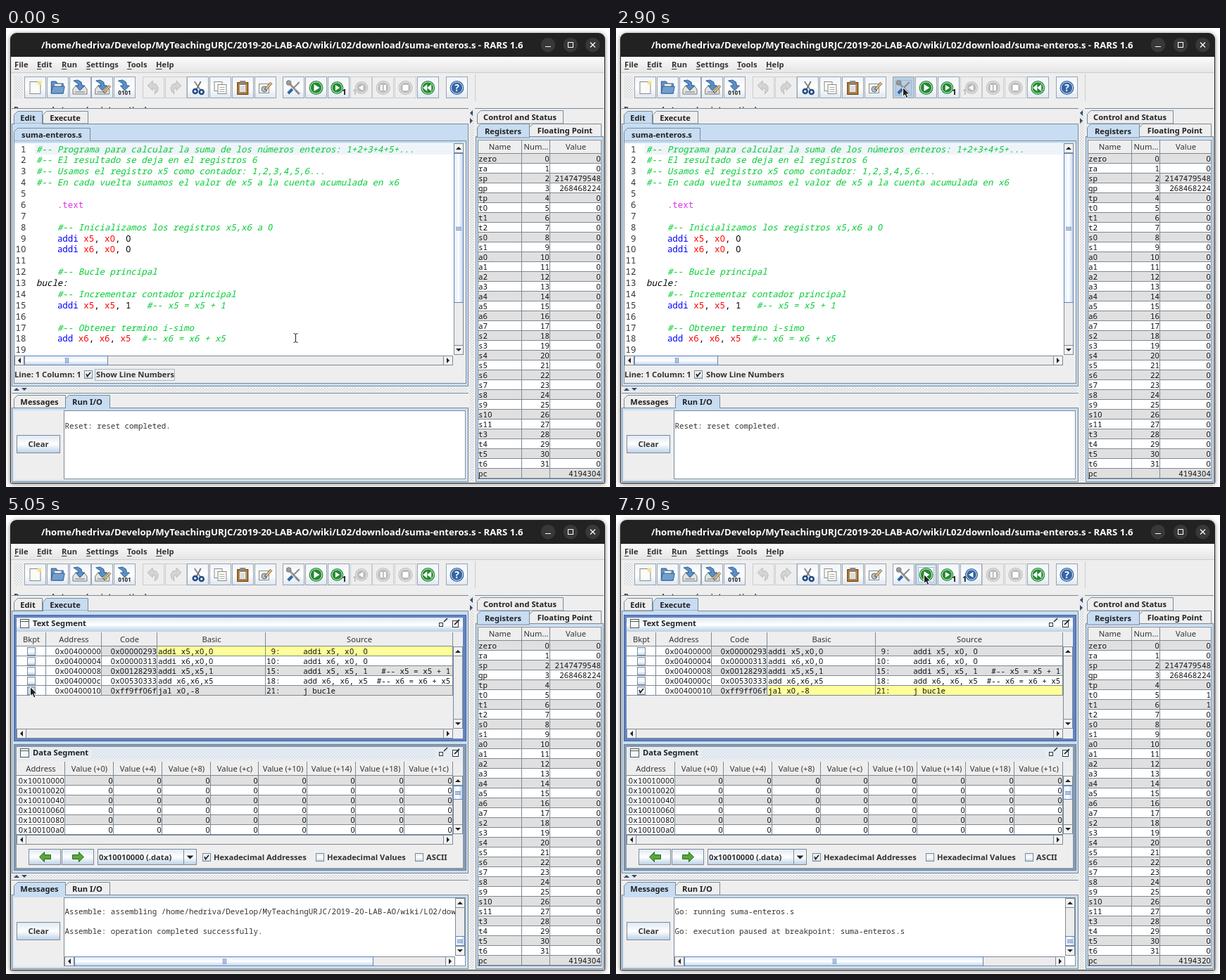
Animation of 858x653 px, one loop 8000 ms. Source, as an HTML page with a canvas:

```html
<!DOCTYPE html>
<html lang="es">
<head>
<meta charset="utf-8">
<title>RARS</title>
<style>
html, body { margin: 0; width: 858px; height: 653px; overflow: hidden; background: #fff; }
canvas { display: block; }
</style>
</head>
<body>
<canvas id="stage" width="858" height="653"></canvas>
<script>
const g = document.getElementById('stage').getContext('2d');
const BOLD = 'bold 11.2px "Noto Sans", sans-serif', PLAIN = '11.2px "Noto Sans", sans-serif';
const SMALL = 10.9, CODE = 12.45, PITCH = .6;
const LINE = '#7a8a99', BLUE = '#c8ddf2', FACE = '#eee', EDGE = '#6382bf', STRIPE = '#e0e0e0';
const PATH = '/home/hedriva/Develop/MyTeachingURJC/2019-20-LAB-AO/wiki/L02/download/suma-enteros.s';

// Drawing helpers
function box(x, y, w, h, fill, line) {
  if (fill) { g.fillStyle = fill; g.fillRect(x, y, w, h); }
  if (line) { g.strokeStyle = line; g.lineWidth = 1; g.strokeRect(x + .5, y + .5, w - 1, h - 1); }
}
function text(s, x, y, font = BOLD, color = '#333', align = 'left') {
  g.font = font; g.fillStyle = color; g.textAlign = align;
  g.fillText(s, x, y);
}
// Fixed-pitch text whose zeros are plain ovals, without a slash
function mono(s, x, y, size = SMALL, color = '#222', right = false, style = '') {
  s = String(s);
  const pitch = size * PITCH;
  if (right) x -= s.length * pitch;
  text(s.replace(/0/g, ' '), x, y, `${style} ${size}px "Noto Sans Mono", monospace`, color);
  for (const zero of s.matchAll(/0/g))
    text('0', x + (zero.index + .5) * pitch, y, `${style} ${size}px "Noto Sans", sans-serif`, color, 'center');
}
function poly(pts, fill, line, width = 1, close = true) {
  g.beginPath();
  for (let i = 0; i < pts.length; i += 2) g.lineTo(pts[i], pts[i + 1]);
  if (close) g.closePath();
  if (fill) { g.fillStyle = fill; g.fill(); }
  if (line) { g.strokeStyle = line; g.lineWidth = width; g.stroke(); }
}
const stroke = (pts, color, width = 1) => poly(pts, null, color, width, false);
function circle(x, y, r, fill, line, width = 1) {
  g.beginPath(); g.arc(x, y, r, 0, 7);
  if (fill) { g.fillStyle = fill; g.fill(); }
  if (line) { g.strokeStyle = line; g.lineWidth = width; g.stroke(); }
}
function clipped(x, y, w, h, draw) {
  g.save(); g.beginPath(); g.rect(x, y, w, h); g.clip(); draw(); g.restore();
}
function shade(x, y, x2, y2, colors = ['#dde8f3', '#fff', '#b8cfe5']) {
  const s = g.createLinearGradient(x, y, x2, y2);
  colors.forEach((c, i) => s.addColorStop(i / (colors.length - 1), c));
  return s;
}
function bumps(x, y, w, h, color = '#b4c0cc') {
  g.fillStyle = color;
  for (let j = 0; j < h; j += 2)
    for (let i = j % 4; i < w; i += 4) g.fillRect(x + i, y + j, 1, 1);
}
function triangle(x, y, dir, r = 4, color = '#222') {
  g.save(); g.translate(x, y); g.rotate(dir * Math.PI / 2);
  poly([-r, r / 2, r, r / 2, 0, -r / 2], color);
  g.restore();
}
function check(x, y, on, pressed) {
  box(x, y, 12, 12, pressed ? '#b8cfe5' : shade(x, y, x, y + 12), LINE);
  if (on) stroke([x + 3, y + 5, x + 4.5, y + 8.5, x + 9, y + 3], '#222', 1.8);
}
function tab(label, x, y, w, h, selected) {
  poly([x + .5, y + h, x + .5, y + 5.5, x + 5.5, y + .5, x + w + .5, y + .5, x + w + .5, y + h], selected ? BLUE : FACE, LINE);
  text(label, x + w / 2, y + h / 2 + 4.5, BOLD, '#222', 'center');
}
function pane(x, y, w, h) {
  box(x, y, w, h, BLUE, LINE);
  box(x + 3, y + 4, w - 6, h - 7, FACE);
}
function scrollbar(x, y, len, vertical, start, size) {
  const w = vertical ? 14 : len, h = vertical ? len : 14;
  box(x, y, w, h, '#ececec', LINE);
  box(x, y, 14, 14, '#f2f2f2', LINE);
  box(x + w - 14, y + h - 14, 14, 14, '#f2f2f2', LINE);
  triangle(x + 7, y + 7, vertical ? 0 : 3);
  triangle(x + w - 7, y + h - 7, vertical ? 2 : 1);
  if (!size) return;
  const tx = vertical ? x : start, ty = vertical ? start : y;
  const tw = vertical ? 14 : size, th = vertical ? size : 14;
  box(tx, ty, tw, th, vertical ? shade(tx, 0, tx + 14, 0) : shade(0, ty, 0, ty + 14), EDGE);
  for (let k = -2; k <= 2; k += 2) {
    if (vertical) box(tx + 3, Math.round(ty + th / 2 + k), 8, 1, EDGE);
    else box(Math.round(tx + tw / 2 + k), ty + 3, 1, 8, EDGE);
  }
}
function header(labels, edges, y, h) {
  labels.forEach((s, i) => {
    const x = edges[i], w = edges[i + 1] - x;
    box(x, y, w, h, FACE);
    box(x + w - 1, y, 1, h, LINE);
    text(s, x + w / 2, y + h / 2 + 4, PLAIN, '#333', 'center');
  });
  box(edges[0], y + h - 1, edges[edges.length - 1] - edges[0], 1, LINE);
}
function cell(s, x, x2, y, fill, right) {
  box(x, y, x2 - x, 14, fill);
  box(x, y + 13, x2 - x, 1, LINE);
  box(x2 - 1, y, 1, 14, LINE);
  mono(s, right ? x2 - 1 : x + 1, y + 11, SMALL, '#111', right);
}

// Toolbar icons, drawn around their own centre
const GREEN = '#238a32', GREY = '#bbb', NAVY = '#3465a4';
const page = (x, y, w, h) => box(x, y, w, h, '#fbfbf7', '#888');
const saveArrow = y => poly([-9, y - 9, -3, y - 10, 2, y - 7, 3, y - 2, 7, y - 2, 0, y + 5, -6, y - 2, -2, y - 2, -3, y - 5, -6, y - 7], '#5b8fc4', '#2d5f96');
function drive() {
  poly([-10, 2, -6, -3, 6, -3, 10, 2, 10, 9, -10, 9], '#e4e4e0', '#777');
  box(-7, 5, 14, 2, '#aaa');
  saveArrow(-1);
}
function bent(dir) {
  poly([-8 * dir, -3, -1 * dir, -10, -1 * dir, -6, 4 * dir, -5, 7 * dir, 0, 6 * dir, 5, 2 * dir, 9, 3 * dir, 2, -1 * dir, 0, -1 * dir, 4], '#d4d4d4', GREY);
}
function ball(x, r, color) { circle(x, 0, r, color); circle(x, 0, r - 1.8, null, '#fff', .9); }
function pencil(x, y) {
  stroke([x, y, x + 9, y - 10], '#666', 4);
  stroke([x + 1, y - 1, x + 9, y - 10], '#e9b96e', 2.5);
}
const play = (x, r) => poly([x - r * .6, -r, x + r, 0, x - r * .6, r], '#fff');
const icons = [
  () => { page(-8, -9, 16, 18); circle(6, -7, 3, '#f4e48a'); },
  () => { poly([-9, 8, -9, -9, -2, -9, 0, -6, 8, -6, 8, 8], '#5b8fc4', '#2d5f96'); page(-5, -6, 11, 7); poly([-9, 8, -7, -2, 10, -2, 8, 8], '#729fcf', '#2d5f96'); },
  drive,
  () => { drive(); pencil(2, 7); },
  () => { saveArrow(-1); text('0101', 0, 10, 'bold 8px "Noto Sans", sans-serif', '#222', 'center'); },
  () => bent(1),
  () => bent(-1),
  () => { stroke([-5, -9, 4, 4], '#888', 2); stroke([4, -9, -3, 4], '#777', 2); circle(-4, 5, 3, null, '#204a87', 2.5); circle(5, 6, 3, null, '#204a87', 2.5); },
  () => { page(-9, -9, 12, 14); page(-4, -5, 13, 14); for (let y = -1; y < 7; y += 3) box(-1, y, 7, 1, '#aaa'); },
  () => { box(-8, -8, 16, 18, '#b5772a', '#6b4310'); page(-5, -5, 10, 12); box(-4, -10, 8, 4, '#888'); for (let y = -2; y < 5; y += 2) box(-3, y, 6, 1, '#bbb'); },
  () => { page(-9, -6, 15, 14); circle(-1, 2, 4, '#a9c4e2', '#666'); pencil(0, 3); },
  () => { stroke([-8, -8, 5, 6], '#999', 3); stroke([8, -8, -1, 1], '#888', 2); stroke([-2, 2, -8, 8], NAVY, 4); stroke([3, 4, 8, 9], '#888', 3); circle(-7, -7, 2.8, null, '#888', 2); },
  () => { ball(0, 10, GREEN); play(0, 5); },
  () => { ball(-2, 9, GREEN); play(-2, 4); text('1', 5, 10, BOLD, '#111'); },
  on => { text('1', -12, 10, BOLD, on ? '#111' : GREY); ball(1, 9, on ? NAVY : GREY); g.scale(-1, 1); play(-1, 4); },
  () => { ball(0, 10, GREY); box(-4, -4, 3, 8, '#fff'); box(1, -4, 3, 8, '#fff'); },
  () => { ball(0, 10, GREY); box(-4, -4, 8, 8, '#fff'); },
  () => { ball(0, 10, GREEN); poly([-7, 0, -1, -5, -1, 5], '#fff'); poly([-1, 0, 5, -5, 5, 5], '#fff'); },
  () => { ball(0, 10, NAVY); text('?', 0, 5, 'bold 14px "Noto Sans", sans-serif', '#fff', 'center'); }
];
const centers = icons.map((_, i) => 41.5 + i * 31.75 + (i > 4 ? 9 : 0) + (i > 10 ? 9 : 0) + (i > 17 ? 9.5 : 0));

function drawToolbar(t, [px, py]) {
  box(8, 66, 658, 38, FACE);
  box(666, 66, 1, 38, '#ccc');
  bumps(12, 69, 11, 32);
  const focus = t >= 7450 ? 12 : t >= 2850 && t < 5050 ? 11 : -1;
  const pressed = t >= 2850 && t < 3050 ? 11 : t >= 7450 && t < 7650 ? 12 : -1;
  icons.forEach((icon, i) => {
    const x = Math.round(centers[i] - 15.5), on = ![5, 6, 15, 16].includes(i) && (i != 14 || t >= 7650);
    box(x, 69, 31, 31, !on ? FACE : i == pressed ? '#b8cfe5' : shade(0, 69, 0, 100, ['#eef3f8', '#fff', '#dce6f0']), on ? '#98a4b0' : '#c8ccd0');
    if (on && px >= x && px < x + 31 && py >= 69 && py < 100) {
      box(x + 1, 70, 29, 29, null, '#b8cfe5');
      box(x + 2, 71, 27, 27, null, '#b8cfe5');
    }
    if (i == focus) box(x + 4, 74, 23, 22, null, '#a3b8cc');
    g.save(); g.translate(centers[i], 85); icon(on); g.restore();
  });
}

function drawWindow() {
  box(0, 0, 858, 653, '#fff');
  g.save();
  g.shadowColor = 'rgba(0,0,0,.5)'; g.shadowBlur = 6; g.shadowOffsetY = 1;
  g.fillStyle = '#222'; g.beginPath(); g.roundRect(6, 7, 845, 641, [9, 9, 2, 2]); g.fill();
  g.restore();
  box(7, 41, 843, 606, FACE);
  text(PATH + ' - RARS 1.6', 50, 28.5, 'bold 13.17px "Noto Sans", sans-serif', '#fff');
  for (const x of [770, 802, 833.5]) circle(x, 24, 10.3, '#383838');
  box(766, 26, 8, 1, '#fff');
  box(798, 20, 8, 8, null, '#fff');
  stroke([830, 20.5, 837, 27.5], '#fff', 1.2); stroke([837, 20.5, 830, 27.5], '#fff', 1.2);
  box(7, 41, 843, 22, shade(0, 41, 0, 63, ['#fbfbfb', '#e6e6e6']));
  box(7, 63, 843, 1, '#ccc');
  [['File', 12], ['Edit', 44], ['Run', 79], ['Settings', 114], ['Tools', 172], ['Help', 213]].forEach(([s, x]) => {
    text(s, x, 56);
    box(x, 58, g.measureText(s[0]).width, 1, '#333');
  });
  clipped(8, 104, 640, 11, () => text('Run speed at max (no interaction)', 11, 120));
}

function drawRegisters(done) {
  box(666, 114, 183, 1, LINE);
  tab('Control and Status', 669, 117, 122, 19);
  tab('Floating Point', 743, 136, 102, 19);
  pane(667, 154, 182, 492);
  tab('Registers', 669, 136, 74, 20, true);
  box(670, 159, 176, 483, '#fff');
  const edges = [670, 733, 773, 846];
  header(['Name', 'Num...', 'Value'], edges, 159, 20);
  const run = (p, a, b) => Array.from({ length: b - a + 1 }, (_, i) => p + (a + i));
  const names = ['zero', 'ra', 'sp', 'gp', 'tp', ...run('t', 0, 2), ...run('s', 0, 1), ...run('a', 0, 7), ...run('s', 2, 11), ...run('t', 3, 6), 'pc'];
  const values = { sp: 2147479548, gp: 268468224, t0: +done, t1: +done, pc: done ? 4194320 : 4194304 };
  names.forEach((name, i) => {
    const row = [name, i < 32 ? i : '', values[name] || 0];
    row.forEach((s, k) => cell(s, edges[k], edges[k + 1], 179 + 14 * i, i % 2 ? '#fff' : STRIPE, k > 0));
  });
  box(670, 159, 176, 483, null, LINE);
}

const source = `#-- Programa para calcular la suma de los números enteros: 1+2+3+4+5+...
#-- El resultado se deja en el registros 6
#-- Usamos el registro x5 como contador: 1,2,3,4,5,6...
#-- En cada vuelta sumamos el valor de x5 a la cuenta acumulada en x6

    .text

    #-- Inicializamos los registros x5,x6 a 0
    addi x5, x0, 0
    addi x6, x0, 0

    #-- Bucle principal
bucle:
    #-- Incrementar contador principal
    addi x5, x5, 1   #-- x5 = x5 + 1

    #-- Obtener termino i-simo
    add x6, x6, x5  #-- x6 = x6 + x5
`.split('\n');
const tokenColors = { '#': '#00cc33', '.': '#e030e8', a: '#00f', x: '#f00' };

function drawEditor(focused) {
  box(9, 137, 647, 372, BLUE);
  box(11, 160, 643, 346, FACE, LINE);
  tab('suma-enteros.s', 11, 142, 108, 19, true);
  box(12, 161, 641, 3, BLUE);
  box(12, 164, 624, 302, '#fff');
  box(41, 165, 595, 15, '#eff4fb');
  clipped(12, 164, 624, 301, () => source.forEach((line, i) => {
    const y = 176.5 + 15.88 * i;
    mono(i + 1, 28.5, y, CODE, '#333', true);
    let col = 0;
    for (const s of line.split(/(#.*|\.\w+|addi?\b|x\d|bucle:)/)) {
      mono(s, 43 + col * CODE * PITCH, y, CODE, tokenColors[s[0]] || '#000', false, /^[#b]/.test(s) ? 'italic' : '');
      col += s.length;
    }
  }));
  scrollbar(636, 164, 301, true, 178, 213);
  scrollbar(12, 466, 623, false, 26, 119);
  text('Line: 1 Column: 1', 12, 497);
  check(111, 487, true);
  text('Show Line Numbers', 128, 497);
  if (focused) box(126, 485, 114, 17, null, '#a3b8cc');
}

function frame(title, y, h, active) {
  const color = active ? EDGE : '#8799ad';
  box(11, y, 643, h, color, active ? '#4a6497' : '#708296');
  box(15, y + 4, 634, h - 8, FACE);
  box(15, y + 4, 634, 20, active ? shade(0, y + 4, 0, y + 24) : '#e6ecf2');
  if (!active) bumps(122, y + 7, 488, 14, '#c6d1dc');
  box(20, y + 6, 13, 13, '#f4f7fa', '#555');
  box(20, y + 9, 13, 1, '#555');
  text(title, 38, y + 16, BOLD, '#222');
  box(615, y + 11, 6, 6, '#fff', '#333');
  stroke([627, y + 5, 622, y + 10], '#333', 1.6);
  box(634, y + 8, 9, 10, '#fff', '#333');
  stroke([637, y + 14, 644, y + 7], '#333', 1.8);
}

const program = [
  ['0x00000293', 'addi x5,x0,0', ' 9:     addi x5, x0, 0'],
  ['0x00000313', 'addi x6,x0,0', '10:     addi x6, x0, 0'],
  ['0x00128293', 'addi x5,x5,1', '15:     addi x5, x5, 1   #-- x5 = x5 + 1'],
  ['0x00530333', 'add x6,x6,x5', '18:     add x6, x6, x5  #-- x6 = x6 + x5'],
  ['0xff9ff06f', 'jal x0,-8', '21:     j bucle']
];
function drawExecute(t) {
  box(9, 137, 647, 372, BLUE);
  frame('Text Segment', 142, 180, true);
  const cols = [15, 57, 136, 215, 369, 635];
  header(['Bkpt', 'Address', 'Code', 'Basic', 'Source'], cols, 167, 20);
  program.forEach(([code, basic, src], i) => {
    const y = 187 + 14 * i, bg = i % 2 ? '#fff' : STRIPE;
    const hot = i == (t >= 7650 ? 4 : 0) ? '#ffff99' : bg;
    cell('', 15, 57, y, '#fff');
    cell('0x004000' + (i * 4).toString(16).padStart(2, 0), 57, 136, y, '#fff', true);
    cell(code, 136, 215, y, bg, true);
    cell(basic, 215, 369, y, hot);
    cell(src, 369, 635, y, hot);
    check(30, y + 1, i == 4 && t >= 5250, i == 4 && t >= 5050 && t < 5250);
  });
  if (t >= 5250 && t < 7450) box(15, 243, 41, 14, null, EDGE);
  scrollbar(635, 187, 117, true);
  scrollbar(15, 304, 620, false);

  frame('Data Segment', 326, 180, false);
  const edges = [15, ...Array.from({ length: 9 }, (_, i) => Math.round(84 + 68.85 * i))];
  header(['Address', ...[0, 4, 8, 'c', 10, 14, 18, '1c'].map(n => `Value (+${n})`)], edges, 351, 20);
  for (let r = 0; r < 6; r++)
    for (let k = 0; k < 9; k++)
      cell(k ? 0 : '0x' + (0x10010000 + 32 * r).toString(16), edges[k], edges[k + 1], 371 + 14 * r, k && r % 2 == 0 ? STRIPE : '#fff', true);
  scrollbar(635, 371, 83, true, 385, 20);
  scrollbar(15, 455, 620, false);
  for (const [x, d] of [[32, -1], [79, 1]]) {
    box(x, 475, 46, 23, shade(0, 475, 0, 498), LINE);
    const m = x + 23.5, p = (a, y) => [m + a * d, 486.5 + y];
    poly([...p(8, 0), ...p(1, -7), ...p(1, -3), ...p(-8, -3), ...p(-8, 3), ...p(1, 3), ...p(1, 7)], '#59a839', '#2c6b1c');
  }
  box(130, 475, 141, 23, shade(0, 475, 0, 498), LINE);
  box(252, 475, 1, 23, LINE);
  triangle(261.5, 487, 2, 5);
  text('0x10010000 (.data)', 132, 490.5);
  [['Hexadecimal Addresses', 279], ['Hexadecimal Values', 440], ['ASCII', 581]].forEach(([s, x], i) => {
    check(x, 481, !i);
    text(s, x + 16, 490.5);
  });
}

function drawMain(t) {
  const running = t >= 3050;
  box(8, 114, 649, 1, LINE);
  tab('Edit', 11, 118, 40, 18, !running);
  tab('Execute', 52, 118, 64, 18, running);
  box(8, 136, 649, 374, BLUE, LINE);
  box(running ? 53 : 12, 136, running ? 63 : 39, 1, BLUE);
  if (running) drawExecute(t); else drawEditor(t < 2850);
  bumps(8, 512, 648, 6);
  triangle(15, 514, 0, 4, '#334a70'); triangle(26, 514, 2, 4, '#334a70');
  bumps(659, 116, 6, 530);
  triangle(661, 121, 3, 4, '#334a70'); triangle(661, 132, 1, 4, '#334a70');
}

function drawConsole(t) {
  const messages = t >= 3050;
  box(8, 519, 649, 1, LINE);
  tab('Messages', 11, 522, 73, 19, messages);
  tab('Run I/O', 84, 522, 63, 19, !messages);
  pane(8, 540, 649, 106);
  box(messages ? 12 : 85, 540, messages ? 72 : 62, 1, BLUE);
  box(15, 579, 62, 26, shade(0, 579, 0, 605), LINE);
  text('Clear', 46, 596, BOLD, '#333', 'center');
  box(82, 544, 571, 98, '#fff', LINE);
  const lines = t >= 7650 ? ['Go: running suma-enteros.s', 'Go: execution paused at breakpoint: suma-enteros.s']
    : messages ? ['Assemble: assembling ' + PATH, 'Assemble: operation completed successfully.']
    : ['Reset: reset completed.'];
  clipped(83, 545, messages ? 555 : 569, 96, () =>
    lines.forEach((s, i) => mono(s, 83.5, (messages ? 568 : 570) + 28 * i, SMALL, '#333')));
  if (messages) {
    scrollbar(638, 545, 82, true, 599, 14);
    scrollbar(83, 628, 555, false, 97, 425);
  }
}

// Pointer path: time, x, y
const path = [
  [0, 411, 441], [550, 411, 441], [1300, 374, 331], [1599, 374, 331], [1600, 403, 223], [1700, 403, 223],
  [2050, 420, 134], [2500, 407, 84], [3350, 407, 84], [3700, 300, 185], [4050, 140, 291], [4200, 101, 285],
  [4250, 91, 280], [4700, 34, 244], [6150, 34, 244], [6200, 69, 244], [6550, 255, 192], [7000, 426, 133],
  [7050, 433, 129], [7300, 437, 84], [8000, 437, 84]
];
function pointer(t) {
  const i = path.findIndex(k => k[0] > t) - 1;
  const [a, b] = [path[i], path[i + 1]], d = b[0] - a[0], u = (t - a[0]) / d;
  const same = (p, q) => !p || !q || (p[1] == q[1] && p[2] == q[2]);
  const slope = (n, k) => {
    const p = path[n - 1], q = path[n + 1];
    return same(p, path[n]) || same(q, path[n]) ? 0 : (q[k] - p[k]) / (q[0] - p[0]);
  };
  return [1, 2].map(k => {
    const ease = u * u * (3 - 2 * u);
    return a[k] + (b[k] - a[k]) * ease + d * u * (1 - u) * ((1 - u) * slope(i, k) - u * slope(i + 1, k));
  });
}
function drawPointer([x, y], t) {
  g.save(); g.translate(Math.round(x), Math.round(y));
  if (t < 3000 && y > 163) {
    for (const [color, w] of [['#fff', 2.5], ['#222', 1]]) {
      stroke([-2.5, -6.5, .5, -5.5, 3.5, -6.5], color, w);
      stroke([.5, -5.5, .5, 5.5], color, w);
      stroke([-2.5, 6.5, .5, 5.5, 3.5, 6.5], color, w);
    }
  } else {
    poly([.5, .5, .5, 13.5, 3.5, 11, 5.5, 16, 8, 15, 6, 10, 10, 10], '#222', '#fff', 1);
  }
  g.restore();
}

function render() {
  const t = Math.floor(performance.now() % 8000 / 50) * 50;
  const pos = pointer(t);
  drawWindow();
  drawToolbar(t, pos);
  drawMain(t);
  drawConsole(t);
  drawRegisters(t >= 7650);
  drawPointer(pos, t);
  requestAnimationFrame(render);
}
render();
</script>
</body>
</html>
```
